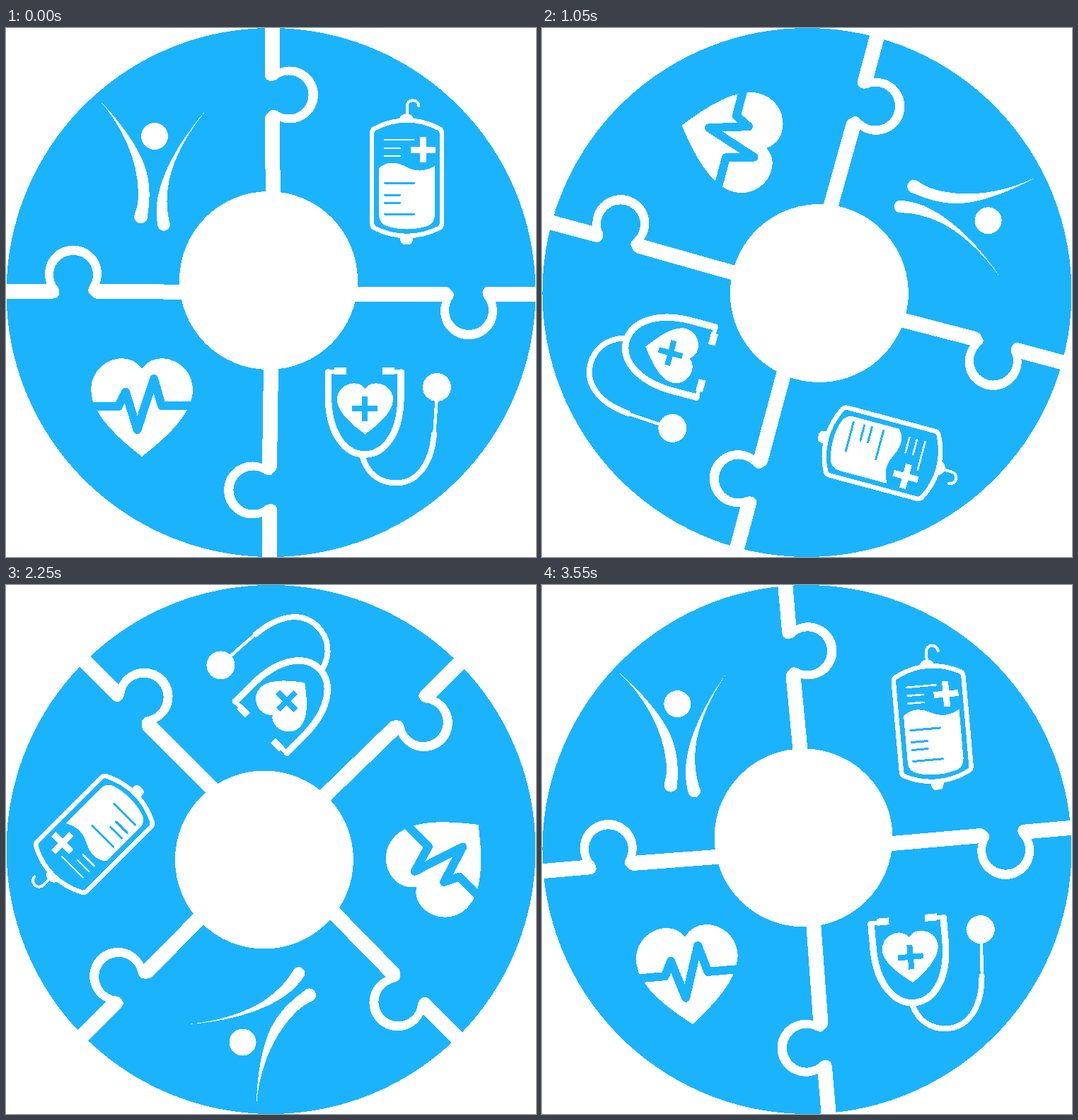
An HTML page that plays this animation: 749 px wide and 748 px high, repeating every 3.6 s.

```html
<!DOCTYPE html>
<html lang="en">
<head>
<meta charset="utf-8">
<title>Health wheel</title>
<style>
  html, body { margin: 0; width: 100%; height: 100%; overflow: hidden; background: #fff; }
  svg { display: block; width: 749px; height: 748px; shape-rendering: crispEdges; }
  .white { fill: #fff; }
  .line { fill: none; stroke: #fff; stroke-linecap: round; stroke-linejoin: round; }
  .cut { fill: none; stroke: #1bb3fc; stroke-linejoin: round; }
</style>
</head>
<body>
<svg viewBox="0 0 749 748">
  <defs>
    <!-- heart with its tip at 0,0 -->
    <path id="heart" d="M0 0C-27 -21 -72 -58 -72 -94C-72 -136 -20 -154 0 -124C20 -154 72 -136 72 -94C72 -58 27 -21 0 0Z"/>
  </defs>
  <g id="wheel">
    <circle cx="374.5" cy="374" r="374" fill="#1bb3fc"/>
    <g id="seams" class="white"></g>
    <circle class="white" cx="371" cy="357" r="126"/>

    <g id="person" class="white">
      <circle cx="210" cy="153" r="19"/>
      <path d="M130 100C162 135 187 185 187 235C187 250 184 257 182 263A9.4 9.4 0 1 0 200 266C204 240 204 218 196 195C186 167 163 134 130 100Z"/>
      <path d="M284 115C252 150 217 205 213 250C212 262 213 272 214.500 280A8.6 8.6 0 1 0 231.500 276C227 260 226 240 230 218C235 190 254 150 284 115Z"/>
    </g>

    <g id="drip">
      <path class="line" stroke-width="6.500" d="M517 149Q517 144 521 142Q543 130.500 566.500 130.500Q590 130.500 612 142Q616 144 616 149V276Q616 281 612 283Q590 294 566.500 294Q543 294 521 283Q517 281 517 276Z"/>
      <path class="line" stroke-width="4" d="M566.500 124V111A8.500 8.500 0 0 1 583.500 110.500"/>
      <path class="white" d="M555 130Q558 121 566 121Q574 121 577 130ZM557 296H575Q575 306 569 306H563Q557 306 557 296Z"/>
      <path class="line" stroke-width="2.600" d="M535 158H576M535 170H557M535 181H557"/>
      <path class="line" stroke-width="9" style="stroke-linecap:butt" d="M572 172H607M589.500 154V190"/>
      <path class="white" d="M527 198C540 187 553 190 565 196C580 204 592 203 606 195V263Q606 276 596 280Q566 289 538 280Q527 276 527 264Z"/>
      <path class="cut" stroke-width="3" stroke-linecap="round" d="M535 219H577M535 236H557M535 247H557M535 263H577"/>
    </g>

    <g id="pulse">
      <use href="#heart" class="white" transform="translate(192 606)"/>
      <path class="cut" stroke-width="12" d="M116 535H159L169 514.500L185.500 568L209 496L220 534H268"/>
    </g>

    <g id="stethoscope">
      <path class="line" stroke-width="9.500" d="M455.500 487V525C457 575 480 603 507 603C534 603 556.500 575 558 525V487"/>
      <path class="line" stroke-width="6" d="M468 486H454M546 486H560"/>
      <path class="white" d="M464 480H481V490H464ZM532 480H549V490H532Z"/>
      <path class="line" stroke-width="8" d="M503.500 605C510 631 530 643.500 551 643.500C584 643.500 602 612 605 574"/>
      <path class="line" stroke-width="4.500" d="M605.500 572L608.500 526"/>
      <circle class="white" cx="609" cy="508" r="20"/>
      <use href="#heart" class="white" transform="translate(507.500 574.500) scale(.55 .52)"/>
      <path class="cut" stroke-width="8" d="M489 538H525M507 521V555.500"/>
    </g>
  </g>
</svg>
<script>
  const CENTER = '374.5 374';
  const wheel = document.getElementById('wheel');
  const seams = document.getElementById('seams');

  // Jigsaw seam pointing up; x is where its left edge meets the hub.
  const seam = x => `M366 -2H387V57A40 40 0 1 1 387 132L${x + 21} 268H${x}L366 127
    Q367 122 373 117.500Q377 113 386 119A28 28 0 1 0 386 70Q381 75 374 75Q366 74 366 66Z`;

  seams.innerHTML = [367, 366, 364, 364.5].map((x, i) =>
    `<path d="${seam(x)}" transform="rotate(${i * 90} ${CENTER})"/>`).join('');

  function draw() {
    const step = Math.floor(performance.now() / 50) % 72;
    wheel.setAttribute('transform', `rotate(${step * 5} ${CENTER})`);
    requestAnimationFrame(draw);
  }
  draw();
</script>
</body>
</html>
```
